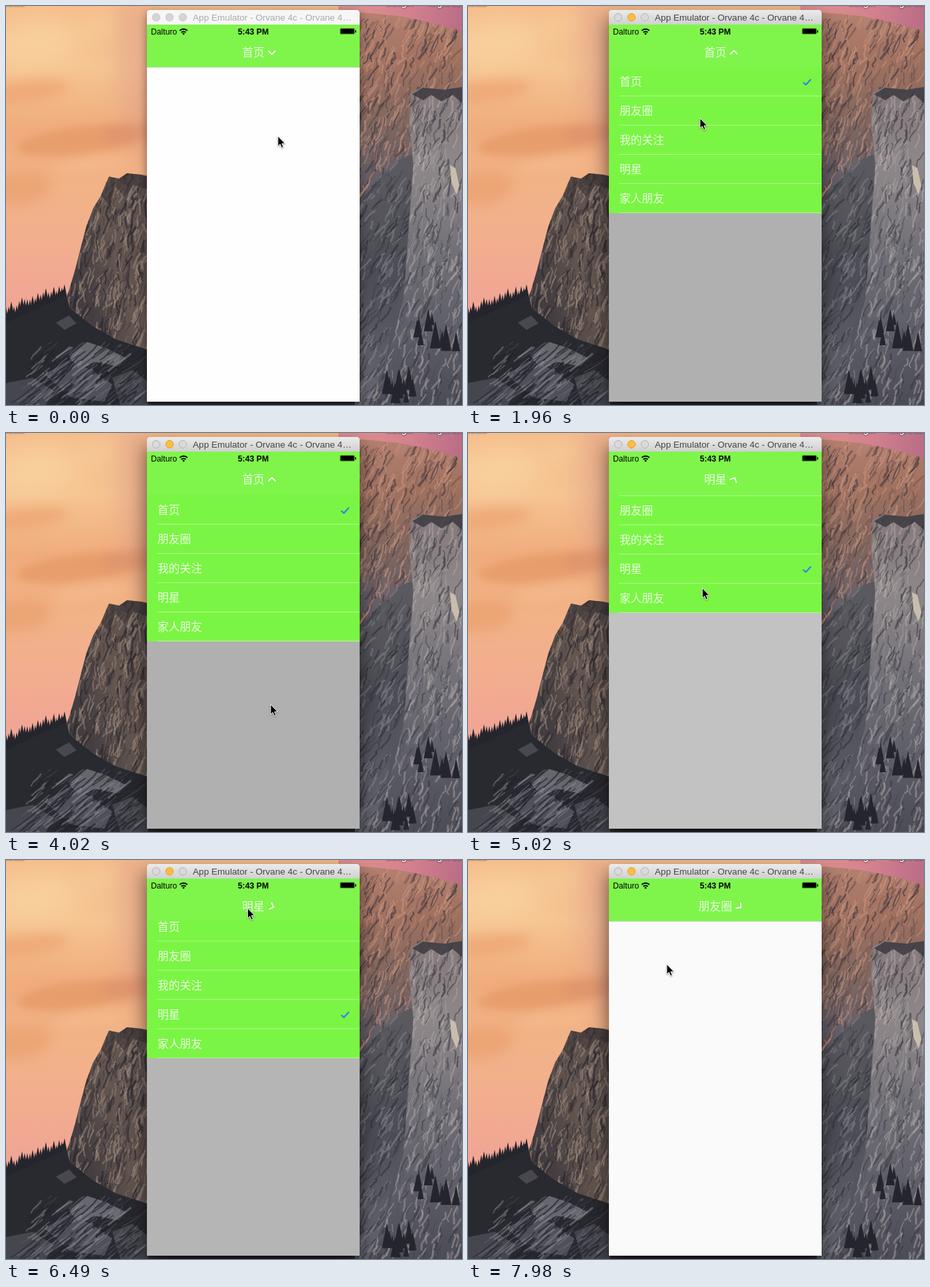
An HTML page with a canvas that plays this animation: 686x601 px, repeating every 8 s.

```html
<!DOCTYPE html>
<html lang="zh">
<head>
<meta charset="utf-8">
<style>
html, body { margin: 0; width: 100%; height: 100%; overflow: hidden; }
canvas, svg { position: absolute; left: 0; top: 0; }
text { font-family: "Liberation Sans", Arial, sans-serif; }
.cjk, .cjk text { font: 100 16.8px "Noto Sans CJK SC", "Noto Sans CJK", sans-serif; fill: #ffffffd8; }
</style>
</head>
<body>
<canvas id="bg" width="686" height="601"></canvas>
<svg width="686" height="601" viewBox="0 0 686 601">
  <defs>
    <clipPath id="below"><rect x="212" y="92" width="320" height="504"/></clipPath>
    <linearGradient id="bar" x2="0" y2="1">
      <stop stop-color="#ebebeb"/><stop offset="1" stop-color="#d0d0d0"/>
    </linearGradient>
  </defs>
  <path id="frame" d="M212 596V11a5 5 0 0 1 5-5H527a5 5 0 0 1 5 5V596Z" fill="#fefefe"/>
  <path id="head" d="M212 28V11a5 5 0 0 1 5-5H527a5 5 0 0 1 5 5V28Z"/>
  <g id="lights" stroke-width="1">
    <circle cx="226" cy="17" r="5.7"/><circle cx="246" cy="17" r="5.7"/><circle cx="266" cy="17" r="5.7"/>
  </g>
  <text id="caption" x="281" y="22" font-size="13.6">App Emulator - Orvane 4c - Orvane 4…</text>

  <path d="M212 92.5H532" stroke="#c9dcc0"/>
  <rect id="dim" x="212" y="92" width="320" height="504"/>
  <g clip-path="url(#below)"><g id="menu" class="cjk">
    <rect x="212" y="-408" width="320" height="720" fill="#7bf544"/>
    <path id="tick" d="M504.3 115l4 3.6 7.7-8.4" fill="none" stroke="#2f83e6" stroke-width="2.2"/>
  </g></g>

  <rect x="212" y="28" width="320" height="64" fill="#7ff54c"/>
  <text x="218" y="43" font-size="12.2">Dalturo</text>
  <g fill="none" stroke="#000" stroke-width="1.9">
    <path d="M261.3 37.2a8.2 8.2 0 0 1 11.6 0M263.7 39.8a4.9 4.9 0 0 1 6.8 0"/>
    <circle cx="267.1" cy="41.8" r=".6"/>
  </g>
  <text x="372" y="43" font-size="12.3" font-weight="bold" text-anchor="middle">5:43 PM</text>
  <rect x="502.5" y="33.5" width="22" height="9" rx="1.5" fill-opacity=".55"/>
  <rect x="503.5" y="34.5" width="20" height="7" rx=".5"/>
  <rect x="525.2" y="36.3" width="1.5" height="4" rx=".7"/>
  <text id="title" class="cjk" x="372" y="75.7" text-anchor="middle"></text>
  <path id="arrow" d="M-5.5-2.7L0 2.7 5.5-2.7" fill="none" stroke="#fff" stroke-width="1.8"/>

  <path id="cursor" d="M0 0V15.3L3.4 12.1 5.8 17.6 8.3 16.5 6 11.2H10.8Z" stroke="#fff" stroke-width="1"
    style="filter:drop-shadow(0 1px 1px #0006)"/>
</svg>
<script>
const $ = id => document.getElementById(id);
const set = (id, attrs) => { for (const k in attrs) $(id).setAttribute(k, attrs[k]); };

// ---- wallpaper ----
const c = $('bg').getContext('2d');
let seed = 7;
const rnd = (a, b) => a + (b - a) * ((seed = seed * 16807 % 2147483647) / 2147483647);

function grad(x0, y0, x1, y1, ...colors) {
  const g = c.createLinearGradient(x0, y0, x1, y1);
  colors.forEach((col, i) => g.addColorStop(i / (colors.length - 1), col));
  return g;
}
function shape(d, fill) {
  const p = new Path2D(d);
  c.fillStyle = fill;
  c.fill(p);
  return p;
}
function cloud(x, y, rx, ry, color, blur = 8) {
  c.filter = `blur(${blur}px)`;
  c.fillStyle = color;
  c.beginPath();
  c.ellipse(x, y, rx, ry, -.12, 0, 7);
  c.fill();
  c.filter = 'none';
}
// Rock grain inside a path: short crooked cracks and ledges
function grain(path, x0, y0, x1, y1, n, lean, colors) {
  c.save();
  c.clip(path);
  for (let i = 0; i < n; i++) {
    let x = rnd(x0, x1), y = rnd(y0, y1);
    c.strokeStyle = colors[i % colors.length];
    c.lineWidth = rnd(.7, 3.2);
    c.beginPath();
    c.moveTo(x, y);
    for (let k = 0; k < 3; k++) {
      const len = rnd(2, 11);
      c.lineTo(x += len * lean + rnd(-4, 4), y += len);
    }
    c.stroke();
  }
  c.restore();
}
function tree(x, y, h) {
  shape(`M${x} ${y - h}l${h * .2} ${h}h${-h * .4}Z`, '#25252d');
}

function wallpaper() {
  c.fillStyle = grad(0, 0, 0, 460, '#f5bd8b', '#f6c592', '#f0ac7d', '#f2b387', '#f2ad8f', '#f0a496');
  c.fillRect(0, 0, 686, 601);
  cloud(45, 55, 70, 36, '#f9d5a4aa', 18);
  cloud(145, 30, 40, 20, '#f8cd9c88', 14);
  cloud(205, 110, 35, 130, '#e0a08a88', 16);
  cloud(25, 130, 70, 16, '#eea574bb');
  cloud(110, 203, 95, 20, '#e69a68cc', 6);
  cloud(185, 192, 40, 15, '#dc9270aa');
  cloud(20, 275, 48, 24, '#eaa06fbb', 9);
  cloud(130, 240, 60, 10, '#f5bd8faa');
  c.fillStyle = grad(532, 0, 686, 30, '#dd8f8d', '#d3808f', '#b86d86');
  c.fillRect(500, 0, 186, 80);

  // left cliff
  const left = shape('M82 460L95 428 104 397 112 366 121 332 131 305 143 285 150 268 155 257 170 260 182 252 203 254 214 257V540L140 520Z',
    grad(100, 360, 212, 330, '#443e41', '#645650', '#5c504d'));
  grain(left, 85, 250, 214, 520, 520, -.25, ['#2c292faa', '#9483779a', '#443d3faa', '#a8917f77']);
  shape('M143 285L155 257 170 260 182 252 203 254 214 256V276L192 270 178 288 165 272 155 300Z', '#3c3335a0');

  // forest and boulders
  c.fillStyle = '#292930';
  c.fillRect(0, 575, 686, 26);
  const ground = shape('M0 468L30 458 60 446 88 426 96 455 130 482 165 502 214 518V601H0Z', '#292930');
  for (let x = 0; x < 92; x += 4) tree(x, 476 - x * .45, rnd(13, 28));
  shape('M75 477L95 466 106 478 88 488Z', '#494850');
  shape('M95 528L122 506 150 515 180 530 170 543 133 536 110 548Z', '#66666e');
  shape('M58 555L92 535 128 548 160 570 148 596 98 590Z', '#50505a');
  shape('M0 568L40 560 72 580 60 601H0Z', '#46464e');
  shape('M160 560L190 548 214 566V601H172Z', '#44444c');
  grain(ground, 40, 505, 214, 600, 190, -1.2, ['#8f8f9877', '#22222aaa', '#6d6d7666', '#25252d99']);

  // right wall
  const wall = shape('M525 9L560 12 590 15 622 21 655 29 686 38V601H525Z',
    grad(560, 10, 590, 330, '#b58070', '#a0715f', '#82685f', '#66616a', '#55555e'));
  grain(wall, 530, 8, 686, 300, 560, -.4, ['#443a40a0', '#cf98808a', '#6d525088', '#bd8c7888']);
  const slab = shape('M525 300L560 262 590 232 612 222 618 350 580 480 560 601H525Z',
    grad(530, 260, 590, 560, '#5b5960', '#4c4d55', '#62626c'));
  grain(slab, 530, 230, 618, 600, 330, -.6, ['#32333aaa', '#84848e88', '#42434b99']);
  const face = shape('M609 130L625 123 660 126 686 123V601H545L578 520 598 440 606 330 613 240 607 180Z',
    grad(620, 125, 650, 600, '#85787a', '#8e8789', '#747279', '#5f5f69', '#4c4c56'));
  grain(face, 550, 125, 690, 600, 700, -.3, ['#3a3b4499', '#aaa3a488', '#53525b99', '#bcb4b066']);
  shape('M611 133L627 123 660 126 686 122V146L672 134 655 144 640 134 628 142Z', '#37363dcc');
  shape('M668 240L676 244 682 270 678 284 670 266Z', '#c9bdae');
  for (let i = 0; i < 16; i++) tree(rnd(572, 612), rnd(575, 601), rnd(18, 38));
  for (let i = 0; i < 9; i++) tree(rnd(618, 686), rnd(470, 520), rnd(16, 42));

  c.font = 'bold 12px "Liberation Sans", Arial, sans-serif';
  c.fillStyle = '#fff';
  c.shadowColor = '#000';
  c.shadowBlur = 3;
  c.fillText('notes', -4, 0);
  c.fillText('budget', 573, 0);
  c.fillText('might do', 635, 0);
}
wallpaper();

// ---- menu ----
const items = ['首页', '朋友圈', '我的关注', '明星', '家人朋友'];
$('menu').insertAdjacentHTML('beforeend', items.map((s, i) =>
  `<text x="228" y="${120.3 + 44 * i}">${s}</text>
   <path d="M227 ${135.5 + 44 * i}H532" stroke="#fff" stroke-opacity=".4"/>`).join(''));

// ---- motion, in ms ----
const open1 = 890, close1 = 4925, open2 = 6320, close2 = 7720;
const grab = 2560, release = 3620, grabY = 142;
const path = [
  [0, 409, 196], [50, 409, 196], [690, 381, 78], [1200, 381, 78], [1720, 366, 137],
  [1960, 349, 169], [2250, 444, 165], [grab, 392, grabY], [3080, 393, 424], [3380, 395, 458],
  [release, 395, 458], [4020, 398, 409], [4370, 362, 267], [4540, 352, 234], [4960, 352, 234],
  [5540, 365, 192], [5720, 362, 126], [6010, 364, 72], [6400, 364, 72], [7170, 334, 106],
  [7570, 299, 157], [8000, 299, 157]];

const ease = p => (p = Math.min(1, Math.max(0, p)), p * p * (3 - 2 * p));
const spring = s => Math.exp(-11.5 * s) * (Math.cos(11.7 * s) + .94 * Math.sin(11.7 * s));
const band = d => 804 * (1 - 1 / (d * .55 / 804 + 1));

// Smooth curve through the path points, at rest wherever the pointer pauses
function pointer(t) {
  let i = 0;
  while (t >= path[i + 1][0]) i++;
  const [a, b] = [path[i], path[i + 1]], span = b[0] - a[0], u = (t - a[0]) / span;
  const slope = (j, k) => {
    const p = path[j - 1], m = path[j], n = path[j + 1];
    if (!p || !n || (m[k] - p[k]) * (n[k] - m[k]) <= 0) return 0;
    return (n[k] - p[k]) / (n[0] - p[0]);
  };
  return [1, 2].map(k => a[k] + (b[k] - a[k]) * ease(u)
    + span * u * (1 - u) * ((1 - u) * slope(i, k) - u * slope(i + 1, k)));
}

// Menu offset from rest, dimming and arrow angle
function menuState(t) {
  const second = t >= open2, from = second ? open2 : open1, to = second ? close2 : close1;
  if (t < from) return [-400, 0, 0];
  if (t < to) {
    const s = (t - from) / 1000, left = spring(s);
    return [-220 * left, .31 * Math.min(1, 1 - left), -180 * ease(s / .4)];
  }
  const s = (t - to) / 1000;
  const shift = s > .26 ? -400 : 100 - 320 * ease(s / .26) - 100 * spring(s);
  return [shift, .31 * (1 - ease(s / .3)), -180 * (1 - ease(s / .4))];
}

function draw(now) {
  const t = now % 8000, [x, y] = pointer(t), active = t >= open1;
  let [shift, dim, angle] = menuState(t);
  if (t >= grab && t < release) shift += band(Math.max(0, y - grabY));
  else if (t >= release && t < close1) {
    const z = (t - release) * .0156;
    shift += band(458 - grabY) * (1 + z) * Math.exp(-z);
  }
  const chosen = t < close1 ? 0 : t < close2 ? 3 : 1;

  $('frame').style.filter = active ? 'drop-shadow(0 12px 14px #0009)' : 'drop-shadow(0 4px 7px #0007)';
  set('head', { fill: active ? 'url(#bar)' : '#f6f6f6' });
  set('caption', { fill: active ? '#444' : '#aaa' });
  [...$('lights').children].forEach((dot, i) => {
    const amber = active && i == 1;
    dot.setAttribute('fill', amber ? '#fdbd40' : active ? '#dadada' : '#d5d5d5');
    dot.setAttribute('stroke', amber ? '#dfa032' : active ? '#b4b4b4' : '#c8c8c8');
  });
  set('dim', { 'fill-opacity': dim });
  set('menu', { transform: `translate(0 ${shift})` });
  set('tick', { transform: `translate(0 ${44 * chosen})` });
  $('title').textContent = items[chosen];
  set('arrow', { transform: `translate(${383 + 8.5 * items[chosen].length} 70) rotate(${angle})` });
  set('cursor', { transform: `translate(${x} ${y})` });
}
function loop() {
  draw(performance.now());
  requestAnimationFrame(loop);
}
loop();
</script>
</body>
</html>
```
